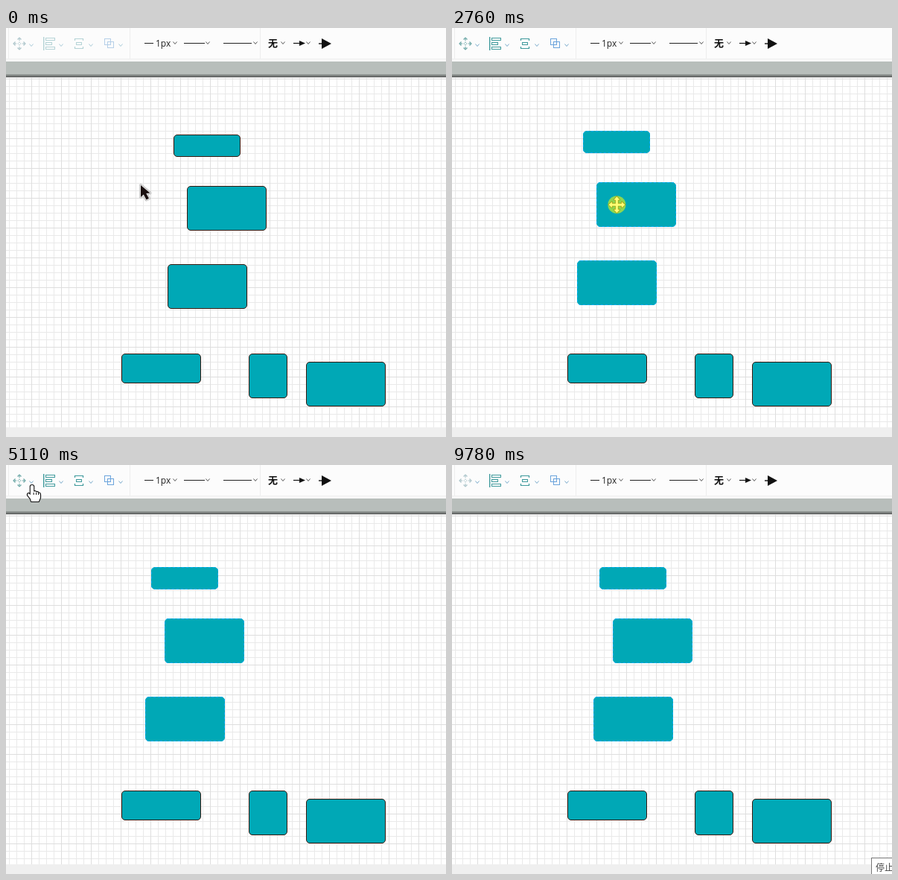
An HTML page with a canvas for the animation above (9.84 s loop, 591x549 px).

```html
<!DOCTYPE html>
<html lang="zh">
<head>
<meta charset="utf-8">
<title>Diagram editor</title>
<style>
html, body { margin: 0; width: 100%; height: 100%; overflow: hidden; background: #fff; }
canvas { display: block; width: 591px; height: 549px; }
</style>
</head>
<body>
<canvas id="stage" width="591" height="549"></canvas>
<script>
const ctx = document.getElementById('stage').getContext('2d');
const LOOP = 9840, STEP = 130.6;
const FONT = '"Open Sans", "DejaVu Sans", "Noto Sans CJK SC", "Noto Sans CJK", sans-serif';
const TEAL = '#00a8b6';

// Moments of the story, in steps
const MARQUEE = 5, SELECT = 11, PRESS = 18.5, DROP = 29.5, TOOLBAR = 39, MENU = 41;
const CLICK_LEFT = 49, CLICK_RIGHT = 60, LEAVE = 68, GONE = 74;
const DRAG_LAG = .35;

const boxes = [
  [225, 143, 90, 30], [243, 212, 107, 60], [217, 317, 107, 60],
  [155, 437, 107, 40], [326, 437, 52, 60], [403, 448, 107, 60]
];

// Turning points of the pointer: [step, x, y]
const stops = [
  [0, 181, 210], [2, 181, 188], [4, 152, 109], [9, 404, 443], [10, 404, 427],
  [PRESS, 283, 243], [23, 178, 233], [26.2, 327, 247], [DROP, 253, 237],
  [33, 376, 267], [TOOLBAR, 35, 27], [46, 26, 55], [54, 26, 55],
  [57, 27, 86], [67, 27, 86], [73, 569, 528]
];

const clamp = (v, lo, hi) => Math.min(hi, Math.max(lo, v));
const within = (k, a, b) => k >= a && k < b;
const ease = u => (1 - Math.cos(Math.PI * u)) / 2;

function pointerAt(k) {
  const next = stops.find(stop => stop[0] > k);
  if (!next) return stops[stops.length - 1].slice(1);
  const [a, x, y] = stops[stops.indexOf(next) - 1];
  const u = ease((k - a) / (next[0] - a));
  return [x + (next[1] - x) * u, y + (next[2] - y) * u];
}

// The selection trails the dragging pointer, then each click nudges it by a pixel.
function selectionShift(k) {
  const [px, py] = pointerAt(PRESS);
  const [x, y] = pointerAt(clamp(k - DRAG_LAG, PRESS, DROP));
  const clicks = (from, rate, total) => clamp(Math.floor((k - from) * rate) + 1, 0, total);
  const nudge = clicks(CLICK_RIGHT, .75, 6) - clicks(CLICK_LEFT, .5, 3);
  return [Math.round(x - px) + nudge, Math.round(y - py)];
}

function fill(color, x, y, w, h) {
  ctx.fillStyle = color;
  ctx.fillRect(x, y, w, h);
}
function trace(points) {
  ctx.beginPath();
  points.forEach(([x, y]) => ctx.lineTo(x, y));
}
function line(color, width, ...points) {
  ctx.strokeStyle = color;
  ctx.lineWidth = width;
  trace(points);
  ctx.stroke();
}
function shape(color, ...points) {
  ctx.fillStyle = color;
  trace(points);
  ctx.fill();
}
function frameRect(color, x, y, w, h) {
  ctx.strokeStyle = color;
  ctx.lineWidth = 1;
  ctx.strokeRect(x + .5, y + .5, w - 1, h - 1);
}
function text(str, x, y, size, color, weight = 400) {
  ctx.font = `${weight} ${size}px ${FONT}`;
  ctx.fillStyle = color;
  ctx.fillText(str, x, y);
}
function at(x, y, angle, draw) {
  ctx.save();
  ctx.translate(x, y);
  ctx.rotate(angle);
  draw();
  ctx.restore();
}
function panel(color, shadow, x, y, w, h, r) {
  ctx.save();
  ctx.shadowColor = shadow;
  ctx.shadowBlur = 6;
  ctx.fillStyle = color;
  ctx.beginPath();
  ctx.roundRect(x, y, w, h, r);
  ctx.fill();
  ctx.restore();
}
function chevron(x, y, color) {
  line(color, 1, [x - 2.5, y - 1.5], [x, y + 1.5], [x + 2.5, y - 1.5]);
}

function drawGrid() {
  fill('#fff', 0, 0, 591, 549);
  for (const major of [false, true]) {
    const color = major ? '#dedede' : '#e9e9e9';
    for (let x = 4; x < 591; x += 10) if ((x % 40 === 34) === major) fill(color, x, 67, 1, 469);
    for (let y = 68; y < 536; y += 10) if ((y % 40 === 28) === major) fill(color, 0, y, 591, 1);
  }
  fill('#efefef', 0, 536, 591, 13);
}

function drawToolbar(k) {
  const active = k >= SELECT;
  const green = active ? '#3f9a9c' : '#b5d3d6';
  const blue = active ? '#6ba4dc' : '#b5cfe8';
  const arrows = active && k < MENU ? '#6fa9a8' : '#aec6cc';

  fill('#fcfcfc', 0, 0, 591, 41);
  fill('#f0f0f0', 0, 41, 591, 1);
  fill('#f7f7f7', 0, 42, 591, 3);
  fill('#b8bebb', 0, 45, 591, 17);
  fill('#8f9492', 0, 62, 591, 2);
  fill('#656867', 0, 64, 591, 2);
  fill('#d5d5d5', 0, 66, 591, 1);
  for (const x of [3, 166, 341]) fill('#ededed', x, 0, 1, 41);

  for (let i = 0; i < 4; i++) at(18, 21, i * Math.PI / 2, () => {
    line(arrows, 1.2, [-2.5, -5.5], [0, -8], [2.5, -5.5]);
    line(arrows, 1.2, [0, -7], [0, -4]);
    line(arrows, 1.2, [0, -2.5], [0, -1]);
  });

  fill(green, 50, 12, 1.4, 18);
  for (let i = 0; i < 3; i++) frameRect(green, 53, 13 + i * 6, i === 1 ? 9 : 13, 4);

  for (const side of [-1, 1]) at(98, 21, 0, () =>
    line(green, 1.2, [-5.5, side * 4], [-5.5, side * 6.5], [5.5, side * 6.5], [5.5, side * 4]));
  frameRect(green, 94, 19, 8, 4);

  frameRect(blue, 132, 14, 9, 9);
  frameRect(blue, 136, 18, 9, 9);
  for (let x = 34; x <= 154; x += 40) chevron(x, 23, active ? '#78aacb' : '#a9cbd9');

  fill('#222', 186, 20, 12, 1);
  text('1px', 201, 25, 12, '#222');
  fill('#222', 239, 20, 28, 1);
  fill('#222', 292, 20, 38, 1);
  text('无', 352, 25, 13, '#111', 700);
  for (const x of [227, 271, 335, 372, 406]) chevron(x, 20, '#555');
  line('#111', 1.2, [386, 20.5], [396, 20.5]);
  shape('#111', [394, 17], [402, 20.5], [394, 24]);
  line('#111', 1.4, [420, 21], [425, 21]);
  shape('#111', [424, 14], [437, 21], [424, 28]);
}

function drawBoxes(k) {
  const [dx, dy] = selectionShift(k);
  boxes.forEach(([x, y, w, h], i) => {
    const movable = i < 3, selected = movable && k >= SELECT;
    if (movable) { x += dx; y += dy; }
    ctx.beginPath();
    ctx.roundRect(x + .5, y + .5, w - 1, h - 1, 4.5);
    ctx.fillStyle = TEAL;
    ctx.fill();
    ctx.lineWidth = 1;
    ctx.strokeStyle = selected ? TEAL : '#38190f';
    ctx.stroke();
    if (!selected) return;
    ctx.setLineDash([3, 3]);
    ctx.strokeStyle = '#00aaf4';
    ctx.stroke();
    ctx.setLineDash([]);
  });
}

function drawMarquee([x, y]) {
  const w = Math.round(x - 15) - 149, h = Math.round(y - 6) - 109;
  fill('rgba(0,200,255,.39)', 149, 109, w, h);
  frameRect('rgba(95,125,135,.65)', 149, 109, w, h);
}

function drawMenu() {
  panel('#fff', 'rgba(0,0,0,.06)', 7, 38, 38, 132, 0);
  [Math.PI, 0, -Math.PI / 2, Math.PI / 2].forEach((angle, i) => {
    const y = 54.5 + i * 32;
    at(26.5, y, angle, () => {
      line('#2c6f70', 1.3, [-6, 0], [6, 0]);
      line('#2c6f70', 1.3, [.5, -5.5], [6, 0], [.5, 5.5]);
    });
    fill('#ccc', 13, Math.round(y + 14), 26, 1);
  });
}

function drawTip(label, y) {
  panel('#3d3d3d', 'rgba(0,0,0,.3)', 46, y, 60, 34, 2);
  shape('#3d3d3d', [46, y + 18], [42, y + 23], [46, y + 28]);
  text(label, 54, y + 22, 14, '#fff');
}

const arrowPath = new Path2D('M0 1V17L3.8 13.6L7.5 20.5L11 18.8L7.3 12L12.5 11.6Z');
const handPath = new Path2D('M-2.2 2Q-2.2 0 0 0Q2.2 0 2.2 2V8.8Q4.6 7.4 5.6 9.4Q8 8.5 8.8 10.6Q11 10.2 11 13V17L8.8 22H-1L-2 18.5L-6 13.5Q-6.4 11 -4.4 11L-2.2 13.3Z');
const movePath = new Path2D('M0 -11L4 -6.5H1.5V-1.5H6.5V-4L11 0L6.5 4V1.5H1.5V6.5H4L0 11L-4 6.5H-1.5V1.5H-6.5V4L-11 0L-6.5 -4V-1.5H-1.5V-6.5H-4Z');

function outline(path, body, edge, width) {
  ctx.lineJoin = 'round';
  ctx.lineWidth = width;
  ctx.strokeStyle = edge;
  ctx.stroke(path);
  ctx.fillStyle = body;
  ctx.fill(path);
}

function drawPointer(k, [x, y]) {
  at(x, y, 0, () => {
    if (within(k, PRESS - 1, DROP + 2)) {
      outline(movePath, '#fff', '#333', 1.6);
    } else if (within(k, TOOLBAR, LEAVE)) {
      outline(handPath, '#fff', '#111', 2.2);
      for (const hx of [2.2, 5.6, 8.6]) line('#111', 1, [hx, 10], [hx, 13]);
    } else {
      outline(arrowPath, '#1a1010', '#c4c4c4', 4);
      outline(arrowPath, '#1a1010', '#f4f4f4', 1.5);
    }
  });
}

function drawPressMark(k, [x, y]) {
  const selecting = within(k, MARQUEE, SELECT);
  const pressed = selecting || within(k, PRESS, DROP + 1) ||
    within(k, CLICK_LEFT, CLICK_LEFT + 2) || within(k, CLICK_RIGHT, LEAVE - 1);
  if (!pressed) return;
  ctx.fillStyle = 'rgba(255,255,0,.55)';
  ctx.beginPath();
  ctx.arc(x - (selecting ? 6 : 0), y - (selecting ? 2 : 0), 12, 0, Math.PI * 2);
  ctx.fill();
}

function render(k) {
  const pointer = pointerAt(k);
  drawGrid();
  drawToolbar(k);
  drawBoxes(k);
  if (within(k, MARQUEE, SELECT)) drawMarquee(pointer);
  if (within(k, MENU, LEAVE)) drawMenu();
  if (within(k, CLICK_LEFT, 55)) drawTip('左移 →'.replace('左移 →', '左移 ←'), 28);
  if (within(k, 57, LEAVE)) drawTip('右移 →', 60);
  if (k < GONE) {
    drawPointer(k, pointer);
    drawPressMark(k, pointer);
  } else {
    fill('#fff', 563, 527, 40, 30);
    frameRect('#777', 563, 527, 40, 30);
    text('停止', 569, 545, 12, '#444');
  }
}

const start = performance.now();
function tick() {
  render(Math.floor((performance.now() - start) % LOOP / STEP));
  requestAnimationFrame(tick);
}
tick();
</script>
</body>
</html>
```
